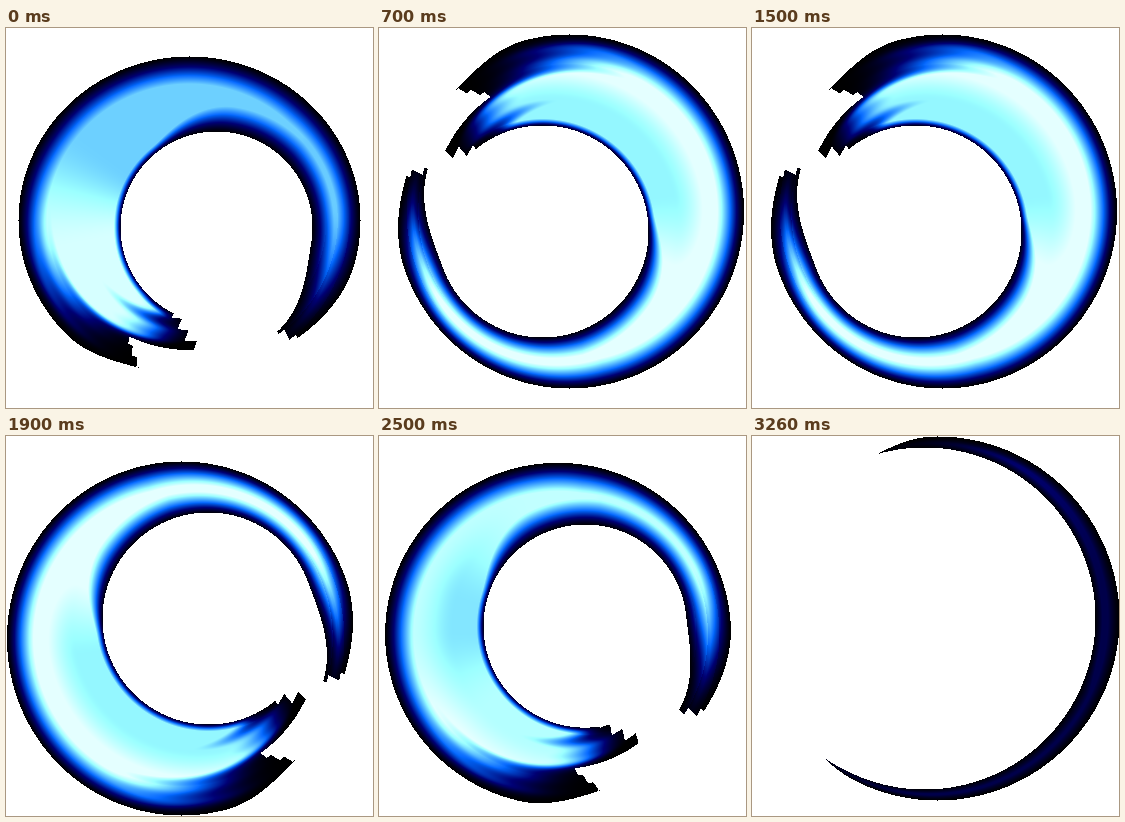
An HTML page with a canvas that plays this animation: 367 by 380 pixels, repeating every 3.29 s.

```html
<!DOCTYPE html>
<html>
<head>
<meta charset="utf-8">
<style>
html, body { margin: 0; width: 100%; height: 100%; overflow: hidden; background: #fff; }
canvas { display: block; }
</style>
</head>
<body>
<canvas id="stage" width="367" height="380"></canvas>
<script>
const W = 367, H = 380, LOOP = 3290;
const ctx = document.getElementById('stage').getContext('2d');
const img = ctx.createImageData(W, H);

// Outer ellipse (cx, cy, rx, ry), hole (ix, iy, ir), angles in degrees
const start = { cx: 183, cy: 192, rx: 171, ry: 164, ix: 210, iy: 199, ir: 96, head: 117, sweep: 289, light: 1.04 };
const full = { cx: 175, cy: 202, rx: 174.5, ry: 177, ix: 202, iy: 182, ir: 106, head: 55, sweep: 316, light: 1.16 };
const last = { cx: 180, cy: 203, rx: 182, ry: 182, ix: 193, iy: 203, ir: 171, head: 69, sweep: 257, light: 0.28 };

const clamp = x => Math.max(0, Math.min(1, x));
const smooth = x => { x = clamp(x); return x * x * (3 - 2 * x); };
const saw = x => x - Math.floor(x);
const easeOut = k => 1 - (1 - k) ** 2;
const mix = (a, b, k) =>
  Object.fromEntries(Object.keys(a).map(n => [n, a[n] + (b[n] - a[n]) * k]));

// Black, navy, blue, cyan, then nearly white
const shade = v => [
  Math.min(228, 420 * Math.max(0, v - 0.53)),
  255 * clamp((v - 0.3) / 0.6),
  255 * clamp(v / 0.55) ** 1.3
];

// Brightness at a point, or -1 outside the stroke
function level(p, x, y) {
  const dx = x - p.cx, dy = y - p.cy;
  const rho = Math.hypot(dx / p.rx, dy / p.ry);
  if (rho > 1) return -1;
  const turn = Math.atan2(dy, dx) * 180 / Math.PI - p.head;
  const a = (turn + 36 + 720) % 360 - 36;   // degrees behind the head

  const nearTail = a - p.sweep;
  const tail = p.sweep + (1 - rho) * 30 + 3 * saw(rho * 15) - 1;
  const edge = 1 - 0.055 * smooth((20 - a) / 30) - 0.05 * smooth((nearTail + 30) / 40);
  const pinch = 27 * Math.min(1, p.light * p.light) * smooth((nearTail + 35) / 50);
  const outer = (edge - rho) * p.rx;
  const inner = Math.hypot(x - p.ix, y - p.iy) - p.ir - pinch;
  if (outer < 0 || inner < 0 || a > tail) return -1;

  // Two torn tongues at the head
  const tip = rho > 0.79
    ? -9 * clamp(1 - Math.abs(rho - 0.94) / 0.15) + 2 * saw(rho * 18)
    : -34 + (0.79 - rho) * 60 + 6 * saw(rho * 15);
  if (a < tip) return -1;

  const thick = outer + inner;
  const outerSoft = Math.min(33, thick * 0.55);
  const innerSoft = Math.min(9 + 22 * smooth((a - 125) / 50), thick * 0.55);
  const body = Math.min(1, 1.15 * clamp(outer / outerSoft) * clamp((inner + 1) / innerSoft));

  const streak = 0.5 + 0.3 * Math.sin(rho * 32) + 0.2 * Math.sin(rho * 71 + 1);
  const rim = smooth((rho - 0.7) / 0.15);
  const front = smooth((a + 32 - 22 * rim) / (30 + 28 * rim + 32 * streak));
  const back = smooth((tail - a + 12) / 70);

  const white = clamp((p.light - 1.04) / 0.12);
  const cool = 0.24 * (1 - white) * smooth((a - 50) / 50);
  const hollow = 0.24 * white * smooth((0.75 - inner / thick) / 0.45) * smooth((175 - a) / 60);
  return body * front * back * p.light * (1 - cool - hollow);
}

function draw(p, flip) {
  for (let y = 0, o = 0; y < H; y++) {
    for (let x = 0; x < W; x++, o += 4) {
      const v = flip ? level(p, 365 - x, 385 - y) : level(p, x, y);
      const [r, g, b] = v < 0 ? [255, 255, 255] : shade(v);
      img.data[o] = r;
      img.data[o + 1] = g;
      img.data[o + 2] = b;
      img.data[o + 3] = 255;
    }
  }
  ctx.putImageData(img, 0, 0);
}

let shown = -1;
function tick(now) {
  const t = now % LOOP;
  const step = t < 3200 ? Math.floor(t / 100) : 32 + Math.min(2, Math.floor((t - 3200) / 30));
  if (step !== shown) {
    shown = step;
    // Each slash grows over four steps, then repeats half a turn on; the final one thins out
    if (step < 32) draw(mix(start, full, easeOut(step % 4 / 3)), (step >> 2) & 1);
    else draw(mix(full, last, (step - 31) / 3), 1);
  }
  requestAnimationFrame(tick);
}
tick(performance.now());
</script>
</body>
</html>
```
